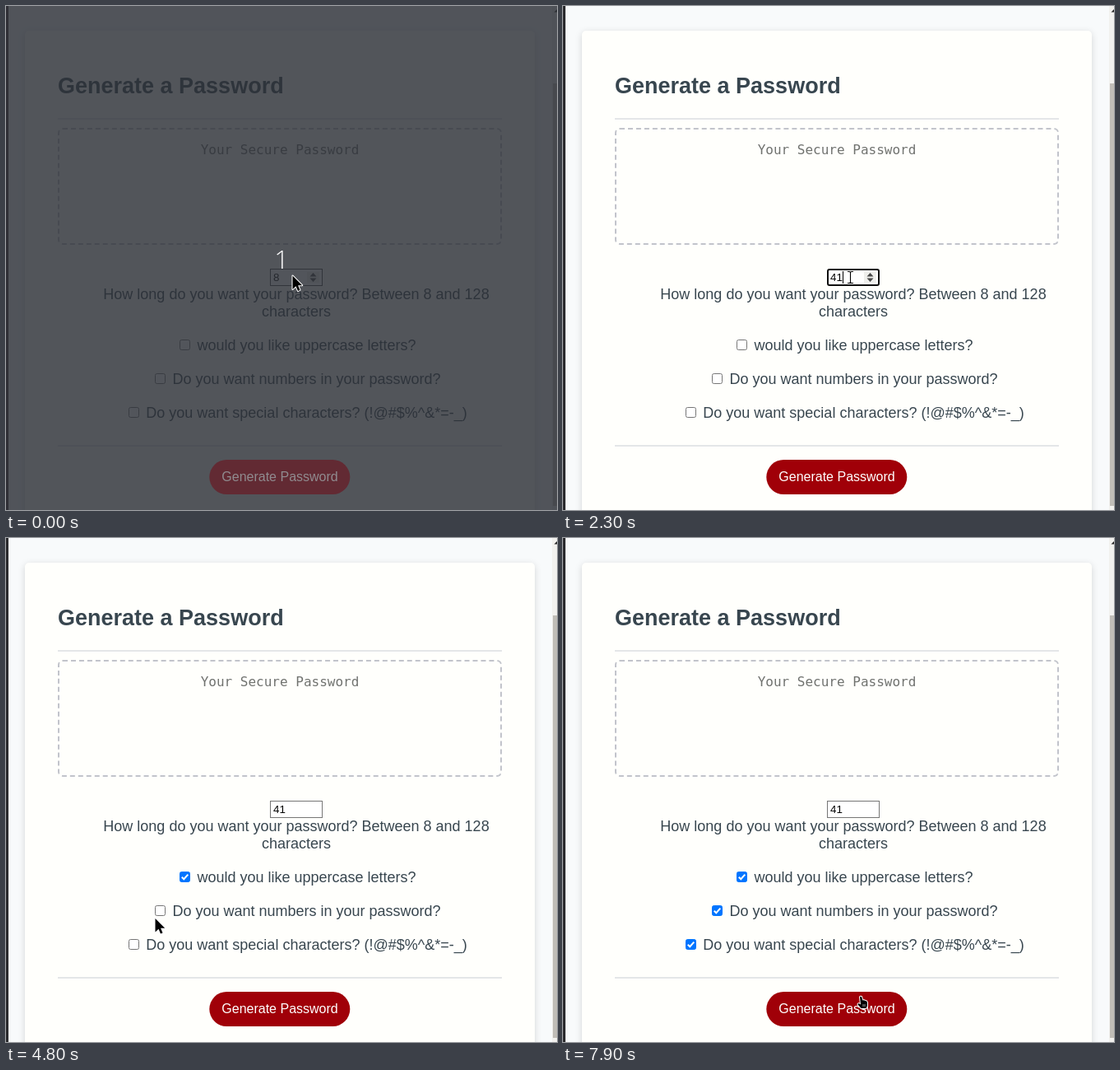
An HTML page that plays this animation: 670 by 612 pixels, repeating every 8000 ms.

```html
<!DOCTYPE html>
<html lang="en">
<head>
<meta charset="utf-8">
<title>Password generator</title>
<style>
html, body { margin: 0; width: 100%; height: 100%; overflow: hidden; }
body { position: relative; background: #f8fafb; }
body, #num { font-family: "Liberation Sans", Arial, sans-serif; }
div, svg { position: absolute; box-sizing: border-box; }
#stage { left: 0; top: 0; width: 670px; height: 612px; overflow: hidden; color: #38464f; font-size: 18px; }
#edge { left: 0; top: 0; width: 3px; height: 612px; }
#track { left: 664px; top: 0; width: 6px; height: 612px; background: #f2f1ee; }
#thumb { left: 665px; top: 94px; width: 5px; height: 513px; background: #c0bdb7; }
#card { left: 23px; top: 30px; width: 620px; height: 640px; border-radius: 5px;
  background: #fffffc; box-shadow: 0 2px 8px rgba(0,0,0,.15); }
#title { left: 63px; top: 82.41px; font-weight: bold; font-size: 27px; white-space: nowrap; }
.rule { left: 63px; width: 540px; height: 2px; background: #e4e6e8; }
#out { left: 63px; top: 148px; width: 540px; height: 142px; padding: 15px; border: 2px dashed #c2c4cb;
  border-radius: 6px; color: #70726f; text-align: center;
  font: 16px "DejaVu Sans Mono", monospace; }
#num { left: 321px; top: 319px; width: 64px; height: 21px; border: 1px solid #767676; background: #fff;
  color: #000; font-size: 13.333px; }
#num.hover { border-color: #4f4f4f; }
#num.focus { border: 2px solid #101010; border-radius: 3px; }
#digits { left: 325px; top: 322px; line-height: 15px; color: #000; font-size: 13.333px; }
#caret { top: 322px; width: 1px; height: 15px; background: #000; }
#spin { left: 366px; top: 323px; }
.label { left: 103px; width: 500px; text-align: center; }
.opt { padding-left: 25px; }
.box { width: 13px; height: 13px; border: 1px solid #767676; border-radius: 2.5px; background: #fff; }
.box.hover { border-color: #4f4f4f; }
.box.off { border-color: #d0d1d0; background: #f6f6f4; }
.box.on { border-color: #0075ff; background: #0075ff; }
.box.on.hover { border-color: #005cc8; background: #005cc8; }
.box svg { left: -1px; top: -1px; display: none; }
.box.on svg { display: block; }
#btn { left: 333px; top: 551px; height: 42px; padding: 0 15px; border-radius: 21px; transform: translateX(-50%);
  background: #a00008; color: #fff; font-size: 16px; line-height: 42px; white-space: nowrap; }
#btn.off { background: #c0c6cb; }
#btn.dim { background: #622a33; color: #908b8f; z-index: 2; }
#shade { left: 0; top: 0; width: 670px; height: 612px; background: rgba(44,48,56,.82); z-index: 1; }
#count { left: 285px; width: 100px; top: 285px; text-align: center; color: #fff;
  font: 300 31px/44px "Open Sans", "Noto Sans", sans-serif; }
#pointer { left: 0; top: 0; z-index: 3; }
</style>
</head>
<body>
<div id="stage">
  <div id="edge"></div>
  <div id="track"></div>
  <div id="thumb"></div>
  <svg width="670" height="10"><path d="M666.5 7.500L670 4V7.500Z" fill="#222"/></svg>
  <div id="card"></div>
  <div id="title">Generate a Password</div>
  <div class="rule" style="top:136px"></div>
  <div id="out">Your Secure Password</div>
  <div id="num"></div>
  <div id="digits"></div>
  <svg id="spin" width="15" height="13">
    <rect width="15" height="13" fill="#efefec"/>
    <path d="M3.500 5.500L7.500 1L11.500 5.500ZM3.500 7.500L7.500 12L11.500 7.500Z" fill="#484848"/>
  </svg>
  <div id="caret"></div>
  <div class="label" style="top:340px">How long do you want your password? Between 8 and 128 characters</div>
  <div class="label opt" style="top:402px">would you like uppercase letters?</div>
  <div class="label opt" style="top:443px">Do you want numbers in your password?</div>
  <div class="label opt" style="top:484px">Do you want special characters? (!@#$%^&amp;*=-_)</div>
  <div class="rule" style="top:533px"></div>
  <div id="btn"></div>
  <div id="shade"><div id="count">1</div></div>
  <svg id="pointer" width="670" height="612">
    <g id="arrow">
      <path d="M0 0V16.500L4 12.800L6.500 18.500L9 17.400L6.600 11.800H11.700Z" fill="#000"
        stroke="#fff" stroke-width="2" stroke-linejoin="round" paint-order="stroke"/>
    </g>
    <g id="beam" fill="none" stroke-linecap="square">
      <path d="M-3 -7H-1.500Q0 -7 0 -5.500V5.500Q0 7 -1.500 7H-3M3 -7H1.500Q0 -7 0 -5.500M3 7H1.500Q0 7 0 5.500"
        stroke="#fff" stroke-width="2.400"/>
      <path d="M-3 -7H-1.500Q0 -7 0 -5.500V5.500Q0 7 -1.500 7H-3M3 -7H1.500Q0 -7 0 -5.500M3 7H1.500Q0 7 0 5.500"
        stroke="#000" stroke-width="1.100"/>
    </g>
    <g id="hand">
      <path d="M-2 1.500Q-1.500 .2 0 1L1.500 5.500L3 5.200L4.500 6L6 6.300L7 8V12L5.500 15H-.5L-4.500 10.500Q-4.500 9 -3 9.300L-1 10.500Z"
        fill="#000" stroke="#fff" stroke-width="2" stroke-linejoin="round" paint-order="stroke"/>
      <path d="M2 10V13M4 10V13" stroke="#fff" stroke-width=".6"/>
    </g>
  </svg>
</div>
<script>
const LOOP = 8000;
const $ = id => document.getElementById(id);

// [time, kind, x, y]
const moves = [
  [0, "arrow", 348.5, 327.5], [100, "beam", 349.5, 329.5],
  [2800, "arrow", 353, 345], [2900, "arrow", 336, 370], [3000, "arrow", 303, 395], [3100, "arrow", 274, 407],
  [3400, "arrow", 245.5, 408.5], [3600, "arrow", 232, 410], [3700, "arrow", 222, 409], [3800, "arrow", 217, 407],
  [4300, "arrow", 212, 416], [4400, "arrow", 203, 431], [4500, "arrow", 192, 447], [4600, "arrow", 183, 457],
  [4800, "arrow", 181.5, 462], [5200, "arrow", 182, 458], [5300, "arrow", 182, 456],
  [5900, "arrow", 178.5, 463], [6000, "arrow", 176, 474], [6300, "arrow", 172, 485], [6400, "arrow", 170, 493],
  [6600, "arrow", 165, 489], [7000, "arrow", 158, 492], [7100, "arrow", 166, 497], [7400, "arrow", 157, 492],
  [7800, "hand", 371, 559], [7900, "hand", 363, 556]
];
const typed = [[0, "8"], [900, "80"], [1800, ""], [2300, "41"]];
const carets = [[0, 0], [500, 332], [900, 340], [1500, 0], [2300, 340], [3100, 0], [3600, 340], [4100, 0]];
const options = [
  { x: 211, y: 405, check: 4100, hover: [[3700, 4300]] },
  { x: 181, y: 446, check: 5600, hover: [[4600, 4800], [5200, 5900]] },
  { x: 149, y: 487, check: 7500, hover: [[7000, 7100], [7400, 7800]] }
];

const within = (t, a, b) => t >= a && t < b;
const at = (list, t) => list.filter(k => k[0] <= t).pop();
const show = (id, on) => { $(id).style.display = on ? "" : "none"; };

for (const o of options) {
  o.el = document.createElement("div");
  o.el.style.left = o.x + "px";
  o.el.style.top = o.y + "px";
  o.el.innerHTML = '<svg width="13" height="13"><path d="M2.800 6.700L5.300 9.200L10.300 3.600" fill="none" stroke="#fff" stroke-width="2"/></svg>';
  $("stage").insertBefore(o.el, $("btn"));
}

function draw(t) {
  const dim = t < 100;
  const short = within(t, 1800, 2300);
  const focus = within(t, 500, 4100);

  show("shade", dim);
  $("edge").style.background = t < 500 ? "#3e2c32" : "#2b2b2e";
  $("num").className = focus ? "focus" : t < 500 ? "hover" : "";
  $("digits").textContent = at(typed, t)[1];
  show("spin", t < 4100);

  const caret = at(carets, t)[1];
  show("caret", caret > 0);
  $("caret").style.left = caret + "px";

  for (const o of options) {
    const hover = o.hover.some(h => within(t, ...h));
    o.el.className = "box" + (short ? " off" : "") + (t >= o.check ? " on" : "") + (hover ? " hover" : "");
  }

  $("btn").className = dim ? "dim" : short ? "off" : "";
  $("btn").textContent = short ? "Your Password is too short." : "Generate Password";

  const [, kind, x, y] = at(moves, t);
  for (const id of ["arrow", "beam", "hand"]) show(id, id === kind);
  $(kind).setAttribute("transform", `translate(${x} ${y})`);
}

const start = performance.now();
function tick(now) {
  draw(Math.max(0, now - start) % LOOP);
  requestAnimationFrame(tick);
}
draw(0);
requestAnimationFrame(tick);
</script>
</body>
</html>
```
